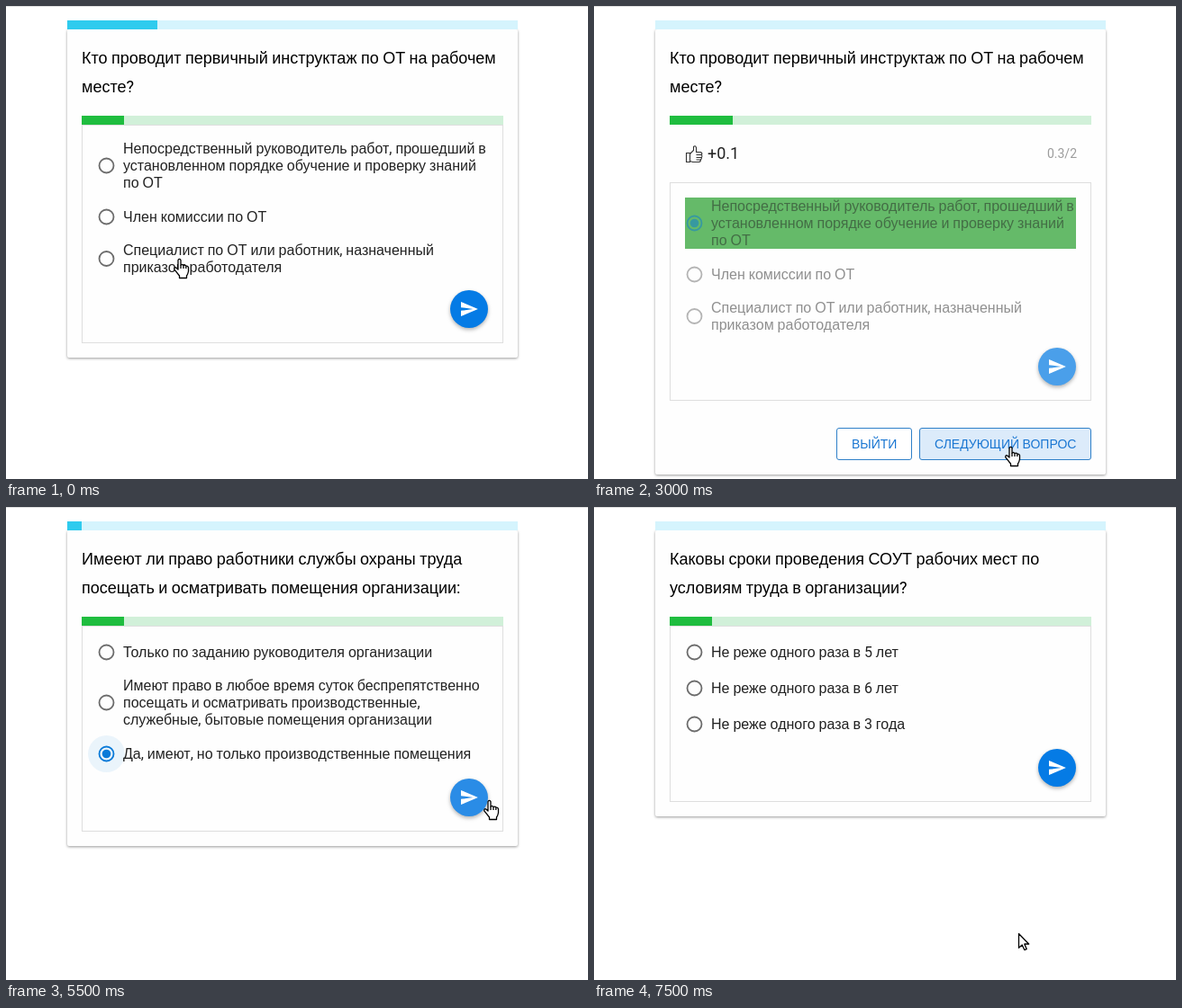
An HTML page for the animation above (8 s loop, 646 by 526 pixels).

```html
<!DOCTYPE html>
<html lang="ru">
<head>
<meta charset="utf-8">
<style>
  html, body { margin: 0; width: 100%; height: 100%; overflow: hidden; background: #fff; }
  svg { display: block; width: 100%; height: 100%; }
  text { font-family: "Liberation Sans", Arial, sans-serif; white-space: pre; }
  .latin { font-family: Roboto, sans-serif; }
  .card { filter: drop-shadow(0 1px 1.5px rgba(0, 0, 0, .4)); }
  .fab { filter: drop-shadow(0 2px 2px rgba(0, 0, 0, .3)); }
</style>
</head>
<body>
<svg id="stage" viewBox="0 0 646 526"></svg>
<script>
const LOOP = 8000, STEP = 250;
const BLUE = '#0a7ad8';

// Each option is [vertical centre, ...lines].
const questions = [
  {
    start: 0, pick: 750, answer: 2000, chosen: 0, right: 0, bottom: 375,
    points: '+0.1', total: '0.3/2', progress: 70,
    timer: t => 100 + t * .006,
    title: ['Кто проводит первичный инструктаж по ОТ на рабочем', 'месте?'],
    options: [
      [177.5, 'Непосредственный руководитель работ, прошедший в', 'установленном порядке обучение и проверку знаний', 'по ОТ'],
      [234.5, 'Член комиссии по ОТ'],
      [281, 'Специалист по ОТ или работник, назначенный', 'приказом работодателя']
    ]
  },
  {
    start: 3500, pick: 4500, answer: 5750, chosen: 2, right: 1, bottom: 361,
    points: '-0.1', total: '0.2/2', progress: 47,
    timer: t => Math.max(0, t - 4000) * 16 / 1500,
    title: ['Имееют ли право работники службы охраны труда', 'посещать и осматривать помещения организации:'],
    options: [
      [161.5, 'Только по заданию руководителя организации'],
      [217.5, 'Имеют право в любое время суток беспрепятственно', 'посещать и осматривать производственные,', 'служебные, бытовые помещения организации'],
      [274.5, 'Да, имеют, но только производственные помещения']
    ]
  },
  {
    start: 7250, pick: Infinity, answer: Infinity, bottom: 328,
    timer: () => 0,
    title: ['Каковы сроки проведения СОУТ рабочих мест по', 'условиям труда в организации?'],
    options: [
      [161.5, 'Не реже одного раза в 5 лет'],
      [201.5, 'Не реже одного раза в 6 лет'],
      [241.5, 'Не реже одного раза в 3 года']
    ]
  }
];

// Pointer tip: [time, x, y]
const pointerPath = [
  [0, 193, 281], [500, 150, 185], [750, 150, 185], [1250, 530, 335], [1500, 519, 386],
  [1750, 518, 345], [2000, 518, 345], [2750, 470, 480], [3000, 463, 490], [3500, 463, 490],
  [3750, 432, 378], [4000, 377, 288], [4500, 125, 272], [4750, 125, 272], [5000, 220, 282],
  [5500, 537, 326], [5750, 534, 328], [6250, 549, 356], [6750, 479, 475], [7250, 479, 475],
  [7500, 471, 474], [LOOP, 471, 474]
];

function pointerAt(t) {
  const i = pointerPath.findIndex(p => p[0] > t);
  const [t0, x0, y0] = pointerPath[i - 1], [t1, x1, y1] = pointerPath[i];
  const k = (t - t0) / (t1 - t0);
  return [Math.round(x0 + (x1 - x0) * k), Math.round(y0 + (y1 - y0) * k)];
}

const rect = (x, y, w, h, fill, extra = '') =>
  `<rect x="${x}" y="${y}" width="${w}" height="${h}" fill="${fill}" ${extra}/>`;
const circle = (x, y, r, fill, extra = '') =>
  `<circle cx="${x}" cy="${y}" r="${r}" fill="${fill}" ${extra}/>`;
// Spaces, punctuation and digits are set in Roboto, Cyrillic in the fallback face.
const text = (x, y, size, fill, str, extra = '') =>
  `<text x="${x}" y="${y}" font-size="${size}" fill="${fill}" ${extra}>` +
  str.replace(/[ ,.:?+\-\/\d]+/g, '<tspan class="latin">$&</tspan>') + '</text>';

function option([centre, ...lines], picked, age, shift, mark) {
  const cy = centre + shift, height = Math.max(22, lines.length * 19);
  const answered = shift > 0;
  let out = mark ? rect(101, Math.round(cy - height / 2), 434, height, mark) : '';
  if (picked && !answered) {
    const r = Math.min(20.5, 5 + age / 750 * 15.5);
    out += circle(111.5, cy, r, BLUE, `opacity="${age > 750 ? .08 : .15}"`);
  }
  out += `<g opacity="${answered ? .5 : 1}">` +
    circle(111.5, cy, 8, 'none', `stroke="${picked ? BLUE : '#6c6c6c'}" stroke-width="1.8"`) +
    (picked ? circle(111.5, cy, 4.8, BLUE) : '');
  lines.forEach((line, i) => {
    out += text(130, Math.round(cy - lines.length * 9.5 + 15 + i * 19), 16, '#222', line);
  });
  return out + '</g>';
}

const sendButton = (y, fill) =>
  circle(514, y, 21, fill, 'class="fab"') +
  `<path transform="translate(503.2 ${y - 10.8}) scale(.9)" fill="#fff" d="M2 21L23 12 2 3V10L17 12 2 14z"/>`;

const button = (x, y, w, label, hover) =>
  rect(x + .5, y + .5, w - 1, 35, hover ? '#dcebfa' : '#fff', 'rx="2.5" stroke="#2f80c8"') +
  text(x + 17, y + 23, 14, '#1976d2', label);

const thumb = down =>
  `<g transform="translate(111.5 164.5) rotate(${down ? 180 : 0})" fill="none" stroke="#333" stroke-width="1.1">
    <path d="M-9 -1H-5V9H-9zM-5 0L-1 -4V-8Q1 -10 2 -7V-2H7Q9 -1 8 1Q9 3 8 4Q8 6 7 6Q7 9 5 9H-2L-5 8M2 1H8M2 4H8M2 6.5H7"/></g>`;

const hand = `<path fill="#fff" d="M-2 12V1.5Q-.5 -.7 1 1.5V7Q3 5.8 4 7.5Q5.8 6.5 6.8 8.2Q8.8 7.6 9.5 9.8V14Q9 17 7.5 19V21.5H-.5V19L-6.2 11.8Q-6.4 9 -4.2 10z"/>
  <path fill="none" d="M1 7V11M4 7.5V11M6.8 8.2V11"/>`;
const arrow = '<path fill="#fff" d="M.5 .5V16.3L4.2 13L6.8 18.6L9.2 17.6L6.8 12H11.7z"/>';

function draw(t) {
  const q = questions.filter(item => t >= item.start).pop();
  const answered = t >= q.answer, picked = t >= q.pick;
  const shift = answered ? 64 : 0;
  const boxBottom = q.bottom + shift, sendY = boxBottom - 38, buttonY = boxBottom + 30;
  const cardBottom = boxBottom + (answered ? 82 : 16);
  const [px, py] = pointerAt(t);

  const overSend = !answered && Math.hypot(px - 514, py - sendY) < 24;
  const overButton = (x, w) => answered && px >= x && px < x + w && py >= buttonY && py < buttonY + 36;
  const overExit = overButton(269, 84), overNext = overButton(361, 191);
  const overOption = !answered && px > 95 && px < 535 && q.options.some(([c, ...lines]) =>
    Math.abs(py - c) <= Math.max(11, lines.length * 9.5));

  let out = rect(0, 0, 646, 526, '#fff') + rect(0, 0, 646, 1, '#e2e2e2');
  out += rect(68, 26, 500, cardBottom - 26, '#fefefe', 'rx="2" class="card"');
  out += rect(68, 16, 500, 10, '#d5f4fd');
  if (!answered) out += rect(68, 16, q.timer(t), 10, '#2fcbee');
  q.title.forEach((line, i) => { out += text(84, 64 + i * 32, 18, '#000', line); });

  out += rect(84, 122, 468, 10, '#d1f0d9') + rect(84, 122, answered ? q.progress : 47, 10, '#1fbd3f');
  out += rect(84.5, 132.5 + shift, 467, q.bottom - 133, 'none', 'stroke="#dedede"');
  if (answered) {
    out += thumb(q.points[0] === '-') + text(126, 170, 18, '#222', q.points) +
      text(536, 169, 14, '#9c9c9c', q.total, 'text-anchor="end"');
  }
  q.options.forEach((item, i) => {
    const chosen = picked && i === q.chosen;
    const mark = !answered ? '' : i === q.right ? '#65ba69' : chosen ? '#f09a9a' : '';
    out += option(item, chosen, t - q.pick, shift, mark);
  });
  out += sendButton(sendY, answered ? '#4a9fea' : overSend ? '#2a8ce6' : '#057be5');
  if (answered) {
    out += button(269, buttonY, 84, 'ВЫЙТИ', overExit) +
      button(361, buttonY, 191, 'СЛЕДУЮЩИЙ ВОПРОС', overNext);
  }
  const isHand = overSend || overExit || overNext || overOption;
  out += `<g transform="translate(${px} ${py})" stroke="#000" stroke-width="1.3" stroke-linejoin="round">${isHand ? hand : arrow}</g>`;
  return out;
}

const stage = document.getElementById('stage');
let shown = -1;
function frame() {
  const t = Math.floor(performance.now() % LOOP / STEP) * STEP;
  if (t !== shown) stage.innerHTML = draw(shown = t);
  requestAnimationFrame(frame);
}
frame();
</script>
</body>
</html>
```
